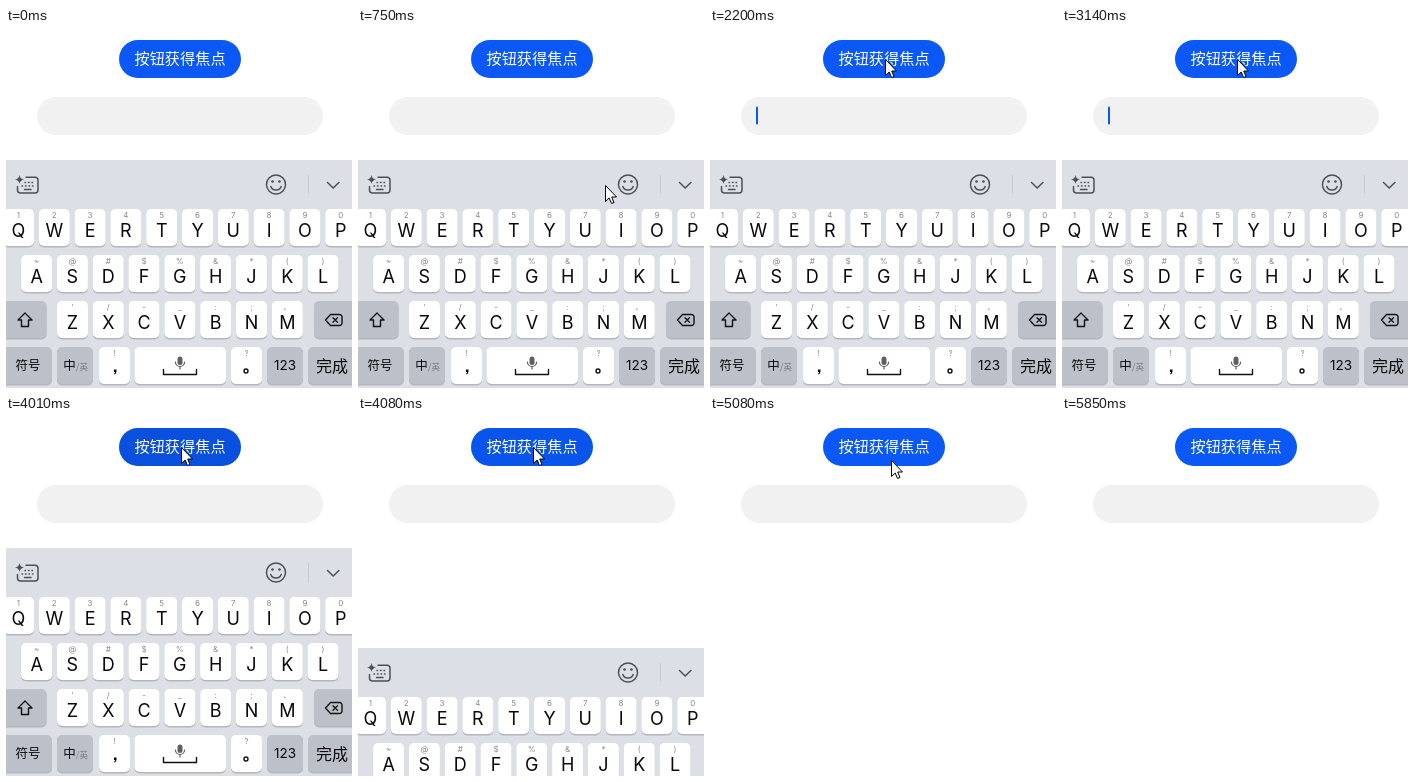
Animation of 346x360 px, one loop 6840 ms. Source, as an HTML page:

```html
<!DOCTYPE html>
<html lang="zh-CN">
<head>
<meta charset="utf-8">
<title>Focus demo</title>
<style>
  html, body { margin: 0; width: 100%; height: 100%; overflow: hidden; background: #fff; }
  svg { display: block; width: 346px; height: 360px; }
  text { text-anchor: middle; font-family: "Noto Sans CJK SC", "Noto Sans CJK", sans-serif; }
  .letter { font: 18px Inter, sans-serif; fill: #080808; }
  .hint { font: 8px Inter, sans-serif; fill: #85878c; }
  .line { fill: none; stroke: #4d4f54; stroke-width: 1.5; stroke-linecap: round; stroke-linejoin: round; }
  .dark { stroke: #111; stroke-width: 1.4; }
</style>
</head>
<body>
<svg viewBox="0 0 346 360">
  <rect x="113" y="12" width="122" height="38" rx="19" fill="#0a59f7"/>
  <rect id="press" x="113" y="12" width="122" height="38" rx="19"/>
  <text x="174" y="36" font-size="15.2" font-weight="500" fill="#fff">按钮获得焦点</text>
  <rect x="31" y="69" width="286" height="38" rx="19" fill="#f1f1f1"/>
  <rect id="caret" x="46" y="78.5" width="2" height="18" rx="1" fill="#0a59f7"/>

  <g id="keyboard">
    <rect y="132" width="346" height="228" fill="#dcdfe6"/>
    <g class="line">
      <path d="M20 149.2H29a3 3 0 0 1 3 3V162a3 3 0 0 1-3 3H14.500a3 3 0 0 1-3-3V158.500"/>
      <path d="M19 154.500h.5m3 0h.5m3 0h.5M16 158h.5m3 0h.5m3 0h.5m3 0h.5M18.500 161.500h6.500"/>
      <circle cx="270" cy="156.500" r="9.500"/>
      <path d="M264.800 158.500a5.400 4.800 0 0 0 10.400 0"/>
      <path d="M321.500 154.500l5.700 5.500 5.700-5.500"/>
    </g>
    <path d="M13.500 147q.6 4 4.500 4.500-3.900.5-4.500 4.500-.6-4-4.500-4.500 3.900-.5 4.500-4.500" fill="#4d4f54"/>
    <g fill="#4d4f54"><circle cx="266.500" cy="153.500" r="1.300"/><circle cx="273.500" cy="153.500" r="1.300"/></g>
    <path d="M302.500 147v19" stroke="#c8cbd2"/>
    <g id="keys"></g>
    <g class="line dark">
      <path d="M19 285l7 7h-3.500v6.500h-7V292H12z"/>
      <path d="M324.500 286.500h9a2.500 2.500 0 0 1 2.500 2.500v6a2.500 2.500 0 0 1-2.500 2.500h-9L319.500 292zM327 289.800l4.500 4.500m0-4.500l-4.500 4.500"/>
      <path d="M157.500 341.500v5h33v-5"/>
      <circle cx="240" cy="343" r="2"/>
    </g>
    <rect x="171.500" y="328.500" width="5" height="8.500" rx="2.500" fill="#5d5f64"/>
    <path d="M169.500 334a4.500 4.500 0 0 0 9 0M174 338.500v2.500" class="line" style="stroke-width:1.100"/>
    <g fill="#080808">
      <text x="22" y="342" font-size="12.500">符号</text>
      <text x="63.500" y="342" font-size="12.500">中</text>
      <text x="76" y="342" font-size="8.500" fill="#777a80">/英</text>
      <text x="279" y="342" style="font:13.500px Inter,sans-serif">123</text>
      <text x="326" y="343.500" font-size="16">完成</text>
      <path d="M108 341.500h2.500v2q0 2.300-2.200 3l-.4-.8q1.200-.5 1.200-1.700H108z"/>
    </g>
  </g>

  <path id="pointer" d="M.5 .5V16.500L4.200 13l2.300 5.500 2.500-1L6.700 12h4.800z" fill="#fff" stroke="#000"/>
</svg>
<script>
const LOOP = 6840, STEP = 70;
const el = id => document.getElementById(id);

const key = (x, y, w, fill = '#fff') =>
  `<rect x="${x}" y="${y + 1}" width="${w}" height="37.500" rx="5" fill="#b3b6be"/>` +
  `<rect x="${x}" y="${y}" width="${w}" height="37" rx="5" fill="${fill}"/>`;
const label = (cls, x, y, s) => `<text class="${cls}" x="${x}" y="${y}">${s}</text>`;
const hint = (x, y, s) => label('hint', x, y + 9, s.replace('&', '&amp;'));

const rows = [
  [12.5, 181, 'QWERTYUIOP', '1234567890'],
  [30.6, 227, 'ASDFGHJKL', '~@#$%&*()'],
  [66.5, 273, 'ZXCVBNM', "'/-_:;、"],
];
const letterKeys = rows.map(([x0, y, letters, hints]) => [...letters].map((c, i) => {
  const x = x0 + 35.8 * i;
  return key(x - 15.5, y, 31) + label('letter', x, y + 28, c) + hint(x, y, hints[i]);
}).join('')).join('');

const GRAY = '#bcc0c9';
const otherKeys = [
  [-10, 273, 50.5, GRAY], [308, 273, 50, GRAY],
  [-10, 319, 56, GRAY], [51, 319, 36, GRAY], [93, 319, 31], [128.5, 319, 91.5],
  [225, 319, 31], [261, 319, 36, GRAY], [302, 319, 56, GRAY],
].map(k => key(...k)).join('');
el('keys').innerHTML = letterKeys + otherKeys + hint(108.5, 319, '!') + hint(240.5, 319, '?');

const blinks = [[70, 600], [1120, 1660], [2200, 2660], [3140, 3670]];
const slide = [[4220, 228], [4150, 198], [4080, 100]];
const shade = [[4150, 0], [4080, .05], [3940, .1], [3870, .05]];
const held = (list, t) => (list.find(([start]) => t >= start) || [0, 0])[1];

function pointerAt(t) {
  if (t < 400 || t >= 5850) return null;
  if (t < 5080) {
    const tick = Math.floor((t - 400) / STEP) * STEP;
    const left = 1 - Math.min(tick / 1330, 1);
    return [175 + 144 * left ** 2.25, 31 + 314 * left ** 3];
  }
  if (t >= 5780) return [314, 349];
  const u = (Math.floor((t - 5080) / STEP) + 1) / 10;
  const p = .8 * u * u * (3 - 2 * u) + .2 * u;
  return [175 + 139 * p, 31 + 312 * p];
}

function draw(t) {
  const show = (id, on) => el(id).setAttribute('visibility', on ? 'visible' : 'hidden');
  const move = (id, x, y) => el(id).setAttribute('transform', `translate(${x} ${y})`);
  show('caret', blinks.some(([on, off]) => t >= on && t < off));
  el('press').setAttribute('opacity', held(shade, t));
  move('keyboard', 0, held(slide, t));
  const at = pointerAt(t);
  show('pointer', at);
  if (at) move('pointer', Math.round(at[0]), Math.round(at[1]));
}

const begin = performance.now();
function tick() {
  draw((performance.now() - begin) % LOOP);
  requestAnimationFrame(tick);
}
tick();
</script>
</body>
</html>
```
